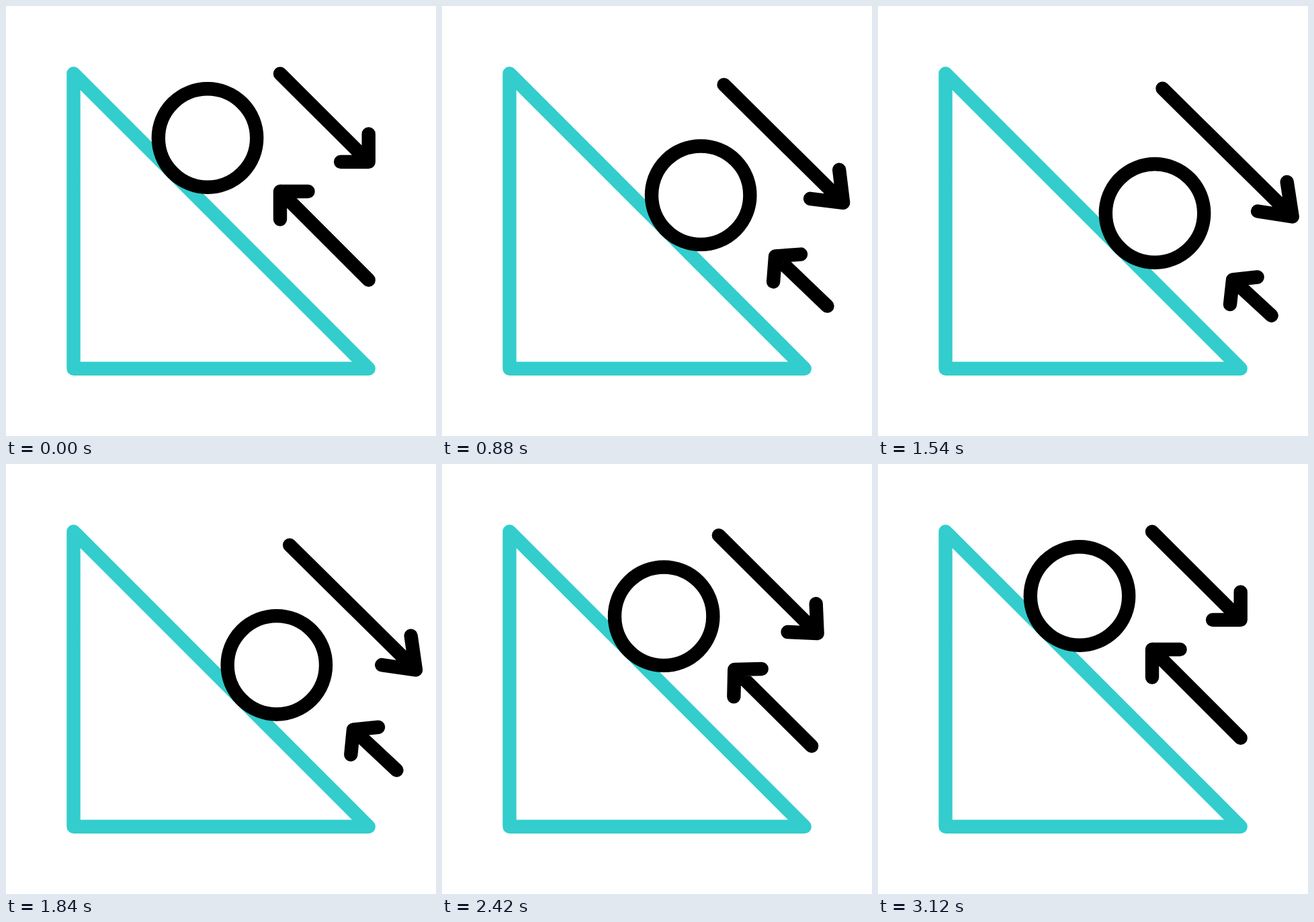
Animation of 640 by 640 pixels, one loop 3.6 s. Source, as an HTML page:

```html
<!DOCTYPE html>
<html lang="en">
<head>
<meta charset="utf-8">
<title>Inclined plane</title>
<style>
  html, body { margin: 0; width: 100%; height: 100%; overflow: hidden; background: #fff; }
  svg { display: block; width: 100%; height: 100%; }
</style>
</head>
<body>
<svg viewBox="0 0 640 640" fill="none" stroke="#000" stroke-width="20.4"
     stroke-linecap="round" stroke-linejoin="round">
  <path stroke="#33cdcd" d="M100.5 100.5V539.7H539.7Z"/>
  <circle id="ball" cx="300" cy="196.5" r="73.2"/>
  <path id="down"/>
  <path id="up"/>
</svg>
<script>
const LOOP = 3600;
const BARB = 41.6;
const byId = id => document.getElementById(id);
const ball = byId('ball'), down = byId('down'), up = byId('up');

// Cubic ease with flat ends; x1 and x2 are the handle positions.
function ease(x, x1, x2) {
  if (x <= 0) return 0;
  if (x >= 1) return 1;
  let lo = 0, hi = 1, s = 0.5;
  for (let i = 0; i < 24; i++) {
    s = (lo + hi) / 2;
    const r = 1 - s;
    const v = 3 * r * r * s * x1 + 3 * r * s * s * x2 + s * s * s;
    if (v < x) lo = s; else hi = s;
  }
  return s * s * (3 - 2 * s);
}

// Roll down the slope, pause, then roll back up.
const progress = t =>
  ease((t - 420) / 1100, 0.28, 0.1) - ease((t - 1645) / 1475, 0.27, 0.4);

const move = (p, dx, dy, q) => ({ x: p.x + dx * q, y: p.y + dy * q });

// Barbs reach back from the tip on the given side (1 or -1);
// growing ones also lean in towards the shaft.
function drawArrow(el, tail, tip, side, grow) {
  const len = side * (BARB + grow), lean = side * grow * 0.8;
  el.setAttribute('d',
    `M${tail.x} ${tail.y}L${tip.x} ${tip.y}` +
    `M${tip.x + lean} ${tip.y + len}L${tip.x} ${tip.y}L${tip.x + len} ${tip.y + lean}`);
}

function draw(t) {
  const p = progress(t);
  const q = p ** 1.07, lag = p ** 1.13;
  ball.setAttribute('transform', `translate(${112 * p} ${112 * p})`);
  drawArrow(down,
    move({ x: 408, y: 100.7 }, 15.5, 22, q),
    move({ x: 539.7, y: 232 }, 77, 81.5, q), -1, 10 * q);
  drawArrow(up,
    move({ x: 539.7, y: 407.7 }, 46, 53, lag),
    move({ x: 408, y: 276 }, 120, 131.5, lag), 1, -5 * lag);
}

const start = performance.now();
function tick() {
  draw((performance.now() - start) % LOOP);
  requestAnimationFrame(tick);
}
draw(0);
requestAnimationFrame(tick);
</script>
</body>
</html>
```
